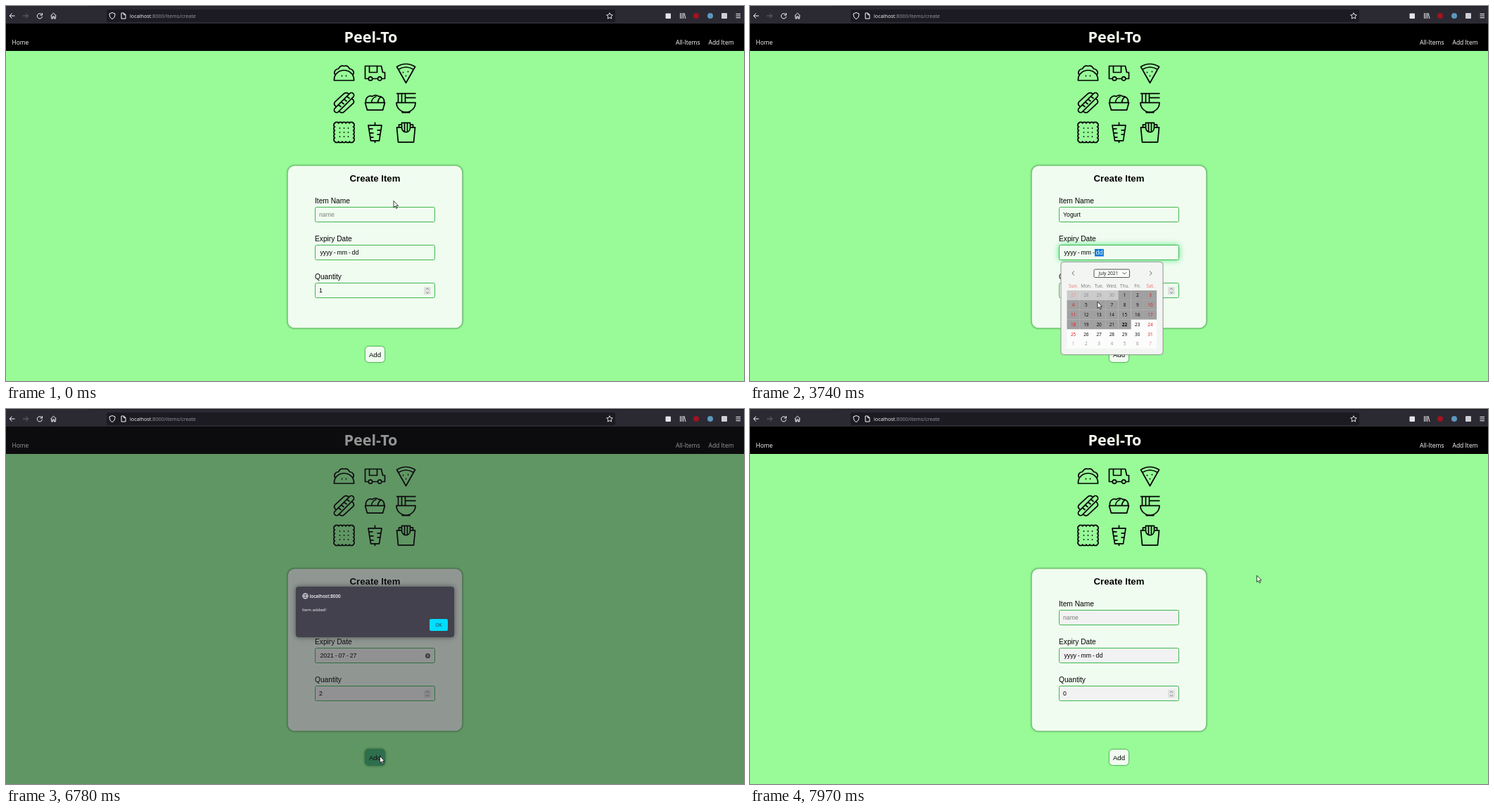
Animation, 1049 px wide and 534 px high, one loop 8 s. Source, as an HTML page with a canvas:

```html
<!DOCTYPE html>
<html lang="en">
<head>
<meta charset="utf-8">
<title>Create Item</title>
<style>
html, body { margin: 0; width: 100%; height: 100%; overflow: hidden; background: #98fb98; }
canvas { display: block; }
</style>
</head>
<body>
<canvas id="stage" width="1049" height="534"></canvas>
<script>
const ctx = document.getElementById('stage').getContext('2d');
const LOOP = 8000;
const SANS = '"Liberation Sans", Arial, sans-serif';
const UI = '"Open Sans", "Noto Sans", sans-serif';

// Moments at which the state changes, in ms
const AT = { caret: 450, focusName: 630, openCalendar: 2950, pickDate: 4590, addOne: 5840,
  hoverAdd: 6640, clickAdd: 6660, dialog: 6780, hoverOk: 7540, pressOk: 7600, close: 7720 };
const TYPED = [1220, 1430, 1550, 1740, 1800, 2050];

// Pointer track: time, x, y
const TRACK = [
  [0, 551, 277.5], [30, 551, 277.5], [450, 533, 295], [2390, 533, 295], [2770, 489, 351],
  [3500, 489, 351], [3740, 494, 421], [4280, 497.5, 466], [5000, 497.5, 466], [5060, 508, 461],
  [5660, 598.5, 400], [6000, 598.5, 400], [6720, 531.5, 494.5], [7150, 531.5, 494.5],
  [7600, 621.5, 307.5], [7720, 621.5, 307.5], [7970, 720.5, 237], [8000, 720.5, 237]
];

// Food icons, drawn around their own centre; dots are x, y pairs
const wave = (dx, dy) => `a${dx ? '2.6 1.5' : '1.5 2.6'} 0 0 1 ${dx} ${dy}`.repeat(5);
const ICONS = [
  ['M-14 10.5H14V9A14 13 0 0 0-14 9ZM-13 2C-15-2-12-6-8-6C-6-10-3-11 0-10C3-11 6-10 8-6C12-6 15-2 13 2', [-3, 4, 3, 4]],
  ['M-9 8H-14V-10H9L11-1H14V8H9.5M-8-10V-1H3V-10M-4 8H4M-9.2 8a2.7 2.7 0 1 0 5.4 0a2.7 2.7 0 1 0-5.4 0' +
   'M4 8a2.7 2.7 0 1 0 5.4 0a2.7 2.7 0 1 0-5.4 0', []],
  ['M0 14L-13-9Q0-17 13-9ZM-11-5Q0-12 11-5', [-4, -1, 3, -2, 0, 4]],
  ['M-13 8L8-13a3.5 3.5 0 0 1 5 5L-8 13a3.5 3.5 0 0 1-5-5ZM-11 6l-2-2a4 4 0 0 1 0-5L0-13a5 5 0 0 1 6 0l1 1' +
   'M11-6l2 2a4 4 0 0 1 0 5L0 13a5 5 0 0 1-6 0l-1-1M-8 3l4 3M-4-1l4 3M0-5l4 3M4-9l4 3', []],
  ['M-14 0H14L11 10.5H-11ZM-13 0C-14-7-9-11-4-9C-1-11 3-11 5-9C10-10 14-5 13 0M-5 0C-5-5-1-8 2-9M4 0C4-4 7-8 9-8', []],
  ['M-13.5 0H13.5A13.5 13.5 0 0 1-13.5 0ZM-6 14H6M-13.5-13H14M-1-7H14M-11-13V0M-6-13V0M-1-13V0', []],
  ['M-13-13' + wave(5.2, 0) + wave(0, 5.2) + wave(-5.2, 0) + wave(0, -5.2) + 'Z',
   [-6, -6, 0, -6, 6, -6, -6, 0, 0, 0, 6, 0, -6, 6, 0, 6, 6, 6]],
  ['M0-14.5V-10M0 12V15M-9.5-10H9.5L6 12H-6ZM-9-5H-3M-8 1H-2M-7 7H-2M9-3H3M8 3H3', []],
  ['M-13-7H-6C-6 2 6 2 6-7H13L11 14H-11ZM-6-6V-13.5H6V-6M-2-1V-13M2-1V-13M-10-7V-11H-6M10-7V-11H6', []]
].map(([d, dots]) => [new Path2D(d), dots]);

const ARROW = new Path2D('M0 0V9.5L2.2 7.4L3.7 10.8L5.2 10.1L3.7 6.9H6.6Z');
const IBEAM = new Path2D('M-2-4H-.5L0-3.5L.5-4H2M0-3.5V3.5M-2 4H-.5L0 3.5L.5 4H2');

function text(str, x, y, size, color = '#000', font = SANS, align = 'left', weight = 400) {
  ctx.font = `${weight} ${size}px ${font}`;
  ctx.textAlign = align;
  ctx.fillStyle = color;
  ctx.fillText(str, x, y);
}

function rect(x, y, w, h, color) {
  ctx.fillStyle = color;
  ctx.fillRect(x, y, w, h);
}

function box(x, y, w, h, r, fill, stroke, glow, blur = 0, width = 1) {
  ctx.beginPath();
  ctx.roundRect(x, y, w, h, r);
  ctx.fillStyle = fill;
  ctx.shadowColor = glow || 'transparent';
  ctx.shadowBlur = blur;
  ctx.fill();
  ctx.shadowColor = 'transparent';
  if (!stroke) return;
  ctx.strokeStyle = stroke;
  ctx.lineWidth = width;
  ctx.stroke();
}

function dot(x, y, r, color) {
  ctx.beginPath();
  ctx.arc(x, y, r, 0, 7);
  ctx.fillStyle = color;
  ctx.fill();
}

function line(d, color, width = 1, x = 0, y = 0) {
  ctx.save();
  ctx.translate(x, y);
  ctx.strokeStyle = color;
  ctx.lineWidth = width;
  ctx.stroke(typeof d === 'string' ? new Path2D(d) : d);
  ctx.restore();
}

function drawBrowser() {
  const ink = '#fbfbfe';
  rect(0, 0, 1049, 25, '#2b2a33');
  rect(118, 0, 931, 1, '#1c1b22');
  box(143, 5, 723, 18, 2, '#1c1b22');
  line('M12.5 14H5M8.5 10.5L5 14L8.5 17.5', ink);
  line('M24 14H31.5M28 10.5L31.5 14L28 17.5', '#6b6a72');
  line('M50.5 11.8A3.6 3.6 0 1 0 51.5 14.8M51.5 10V13H48.5', ink);
  line('M63.5 14L67.5 10.2L71.5 14M64.7 13.5V18H66.5V15H68.5V18H70.3V13.5', ink);
  line('M151 9.5L155 11C155 15 153.5 17.5 151 18.5C148.5 17.5 147 15 147 11Z', ink);
  line('M164 10H167.5L170 12.5V18H164ZM167.5 10V12.5H170', ink);
  line('M858 9.7L859.3 12.5L862.3 12.9L860.1 15L860.7 18L858 16.5L855.3 18L855.9 15L853.7 12.9L856.7 12.5Z', ink, .9);
  text('localhost', 176, 17, 7.25, ink, UI);
  text(':8000/items/create', 176 + ctx.measureText('localhost').width, 17, 7.25, '#9b9aa2', UI);
  box(937.5, 10.5, 7.5, 7.5, 1, '#e4e4ea');
  line('M958.5 10V18M960.7 10V18M962.9 10V18M964 10.2L966 18', ink, .9);
  dot(981, 14, 4, '#a01420');
  dot(1001, 14, 4, '#5c98bd');
  box(1017, 10, 8, 8, 1, '#cfcfd4');
  line('M1037.5 11.3H1044M1037.5 14H1044M1037.5 16.7H1044', ink);
}

function drawHeader() {
  rect(0, 25, 1049, 39, '#000');
  text('Home', 8.5, 54.5, 8.4, '#fff', UI, 'left', 500);
  text('Peel-To', 518.5, 51.5, 21.5, '#f4fbf0', UI, 'center', 700);
  text('All-Items', 952, 54.5, 8.5, '#fff', UI, 'left', 500);
  text('Add Item', 998.5, 54.5, 8.5, '#fff', UI, 'left', 500);
  ctx.lineJoin = 'round';
  ICONS.forEach(([path, dots], i) => {
    const x = 480.5 + i % 3 * 44, y = 95.5 + Math.floor(i / 3) * 42.2;
    line(path, '#000', 1.7, x, y);
    for (let k = 0; k < dots.length; k += 2) dot(x + dots[k], y + dots[k + 1], .9, '#000');
  });
  ctx.lineJoin = 'miter';
}

function field(label, y, focused, gray) {
  text(label, 439, y - 6, 10.2);
  box(439.5, y - .5, 170, 21, 2, gray ? '#f2f2f2' : '#f0fcf0', '#3cb84e', focused && 'rgba(20,225,80,.8)', 8);
}

function drawDate(t) {
  const picked = t >= AT.pickDate && t < AT.close;
  const parts = picked ? ['2021', '07', '27'] : ['yyyy', 'mm', 'dd'];
  const selected = t >= AT.openCalendar && t < AT.clickAdd;
  let x = 446.5;
  parts.forEach((part, i) => {
    const last = i === 2;
    ctx.font = `8.74px ${SANS}`;
    const w = ctx.measureText(part).width;
    if (last && selected) rect(x - 1.5, 346, w + 3, 10.5, '#0078d7');
    text(part, x, 354, 8.74, last && selected ? '#fff' : '#000');
    if (!last) text('-', x + w + 1.9, 354, 8.74);
    x += w + 6.5;
  });
  if (picked) {
    dot(599.5, 351.5, 3.5, '#555');
    line('M598 350L601 353M601 350L598 353', '#fff', .9);
  }
}

function drawForm(t) {
  const reset = t >= AT.close;
  const nameFocus = t >= AT.focusName && t < AT.openCalendar;
  const dateFocus = t >= AT.openCalendar && t < AT.dialog;
  const late = t >= AT.pickDate;

  box(400, 227, 249, 232, 10, '#f0fcf0', '#78c67a', 'rgba(0,90,0,.5)', 3, 1.6);
  text('Create Item', 524.5, 250, 13.2, '#000', SANS, 'center', 700);

  field('Item Name', 287, nameFocus, nameFocus || reset);
  const name = reset ? '' : 'Yogurt'.slice(0, TYPED.filter(at => t >= at).length);
  text(name || 'name', 445, 300, 8.74, name ? '#000' : '#7b7f7b');
  const caretOn = t >= AT.caret && t < 2390 && !(t >= 970 && t < 1220);
  if (caretOn) rect(445 + (name ? ctx.measureText(name).width : 0), 292, .8, 10, '#000');

  field('Expiry Date', 341, dateFocus, late);
  drawDate(t);

  field('Quantity', 395, false, late);
  text(reset ? '0' : t >= AT.addOne ? '2' : '1', 445, 408, 8.74);
  rect(594, 400, 10, 11, '#e0e2e0');
  line('M597 403.8L599 401.8L601 403.8M597 407.2L599 409.2L601 407.2', '#777', .9);

  box(510.5, 484.5, 28, 23, 5, '#f0fcf0', '#5cbc62', 'rgba(0,90,0,.4)', 2);
  if (t >= AT.hoverAdd && !reset) {
    ctx.globalAlpha = Math.min(1, (t - AT.hoverAdd) / 110);
    box(510.5, 484.5, 28, 23, 5, '#3cb371', '#3cb371', 'rgba(0,90,0,.6)', 4);
    ctx.globalAlpha = 1;
  }
  text('Add', 524.5, 499.5, 9.6, '#000', SANS, 'center');
}

function drawCalendar() {
  const colX = c => 459.6 + c * 18.23;
  const weekend = c => c % 6 === 0;
  box(442, 364.5, 145, 132, 4, '#f2f5f2', '#989c98', 'rgba(0,0,0,.25)', 2);
  line('M461 377.5L457.8 380.5L461 383.5M568 377.5L571.2 380.5L568 383.5', '#555', .9);
  box(489, 375, 50.5, 11.5, 1.5, '#fafcfa', '#555');
  text('July 2021', 495.5, 383.3, 6.7, '#111', UI);
  line('M529.5 379.2L532.2 382L535 379.2', '#444', .9);
  rect(450.5, 405, 127.6, 83, '#fbfcfb');
  ['Sun.', 'Mon.', 'Tue.', 'Wed.', 'Thu.', 'Fri.', 'Sat.'].forEach((day, c) =>
    text(day, colX(c), 400.8, 6.4, weekend(c) ? '#f06a6a' : '#777', UI, 'center'));
  for (let i = 0; i < 42; i++) {
    const c = i % 7, row = Math.floor(i / 7), day = i - 3;
    const outside = day < 1 || day > 31;
    const label = day < 1 ? day + 30 : day > 31 ? day - 31 : day;
    const x = colX(c), y = 405 + row * 13.8;
    if (day <= 22) rect(x - 9.12, y, 18.3, 13.9, outside ? '#cbcbcb' : '#a0a0a0');
    const color = weekend(c) ? (outside ? '#f09090' : '#e8141c') : outside ? '#8c8c8c' : '#000';
    text(label, x, y + 9.3, 6.4, color, UI, 'center', day === 22 ? 700 : 400);
  }
}

function drawDialog(t) {
  rect(0, 25, 1049, 509, 'rgba(28,27,34,.45)');
  box(412, 253, 225, 72, 4, '#42414d', null, 'rgba(0,0,0,.5)', 7);
  line('M421.7 266.3a3.8 3.8 0 1 0 7.6 0a3.8 3.8 0 1 0-7.6 0M421.7 266.3H429.3' +
    'M425.5 262.5Q421.8 266.3 425.5 270.1Q429.2 266.3 425.5 262.5', '#fbfbfe', .8);
  text('localhost:8000', 431.5, 268.8, 6.4, '#fbfbfe', UI, 'left', 600);
  text('Item added!', 421, 288, 6.1, '#fbfbfe', UI);
  box(602, 299, 26, 17, 2, t >= AT.pressOk ? '#aaf2ff' : t >= AT.hoverOk ? '#80ebff' : '#00ddff');
  text('OK', 615, 310, 6.4, '#2b2a33', UI, 'center');
}

function drawPointer(t, dialogOpen) {
  const i = TRACK.findIndex(([at]) => at > t);
  const [t0, x0, y0] = TRACK[i - 1], [t1, x1, y1] = TRACK[i];
  const k = (t - t0) / (t1 - t0);
  const x = x0 + (x1 - x0) * k, y = y0 + (y1 - y0) * k;
  const overName = y > 287 && y < 308 && x > 439 && x < 610;
  const overQuantity = y > 395 && y < 416 && x > 439 && x < 594;
  const calendarOpen = t >= AT.openCalendar && t < AT.pickDate;
  if (!dialogOpen && !calendarOpen && (overName || overQuantity)) {
    line(IBEAM, '#222', .9, x, y);
    return;
  }
  ctx.save();
  ctx.translate(x, y);
  ctx.fillStyle = '#fff';
  ctx.fill(ARROW);
  ctx.restore();
  line(ARROW, '#111', .8, x, y);
}

function frame(now) {
  const t = now % LOOP;
  const dialogOpen = t >= AT.dialog && t < AT.close;
  rect(0, 0, 1049, 534, '#98fb98');
  drawBrowser();
  drawHeader();
  drawForm(t);
  if (t >= AT.openCalendar && t < AT.pickDate) drawCalendar();
  if (dialogOpen) drawDialog(t);
  drawPointer(t, dialogOpen);
  requestAnimationFrame(() => frame(performance.now()));
}
frame(performance.now());
</script>
</body>
</html>
```
